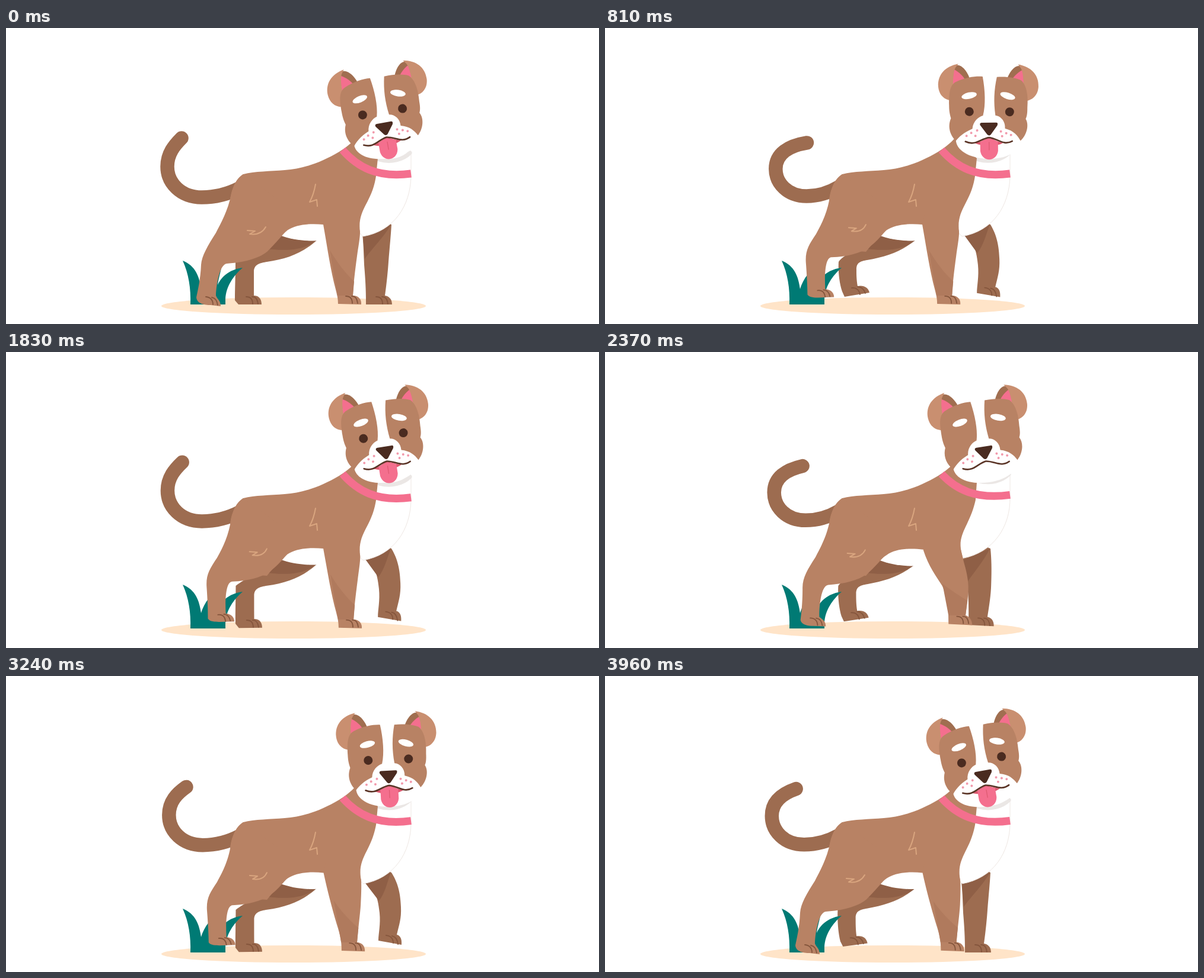
An HTML page for the animation above (3990 ms loop, 1000x500 px).

```html
<!DOCTYPE html>
<html lang="en">
<head>
<meta charset="utf-8">
<title>Walking dog</title>
<style>
  html, body { margin: 0; width: 100%; height: 100%; overflow: hidden; background: #fff; }
  svg { display: block; width: 100%; height: 100%; }
  .coat { fill: #b88264; }
  .dark { fill: #9d6c50; }
  .shade { fill: #8f5f46; }
  .white { fill: #fff; }
  .pink { fill: #f46f8e; }
  .eye { fill: #4a2b20; }
  .line { fill: none; stroke-linecap: round; stroke-linejoin: round; }
  .toes { stroke: #85563d; stroke-width: 1.8; }
  .fur { stroke: #d9a57f; stroke-width: 2; }
</style>
</head>
<body>
<svg viewBox="0 0 1000 500">
  <defs>
    <g id="ear">
      <path fill="#a06e50" d="M588 66C599 55 612 72 616 85L588 100Z"/>
      <path class="pink" d="M589 69C599 74 606 82 609 88C600 90 594 95 587 101Z"/>
      <path fill="#c98f70" d="M597 60C575 64 562 78 563 98C564 112 573 122 588 122C589 103 586 80 592 67Z"/>
    </g>
  </defs>

  <ellipse cx="485" cy="469.5" rx="223" ry="14.5" fill="#ffe4c8"/>
  <path id="tail" class="line" stroke="#9d6c50" stroke-width="23.5"/>
  <path id="farFront" class="dark"/>
  <path id="farFrontShade" class="shade"/>
  <path id="farFrontToes" class="line toes"/>
  <path id="farBack" class="dark"/>
  <path class="shade" d="M462 350L523 359C500 377 470 377 432 372Z"/>
  <path id="farBackToes" class="line toes"/>
  <path fill="#007a74" d="M298 393C320 402 326 420 329 441C334 425 346 405 364 401C362 412 358 425 357 434C364 418 380 407 399 405C384 418 371 436 370 458V467H311C312 440 308 415 298 393Z"/>

  <path id="belly" class="white"/>
  <path id="chest" class="white" stroke="#eee7e3"/>
  <path id="chinShadow" class="line" stroke="#ebe7e5" stroke-width="7"/>
  <path id="torso" class="coat"/>
  <path id="nearBack" class="coat"/>
  <path id="nearBackToes" class="line toes"/>
  <path id="nearFront" class="coat"/>
  <path id="nearFrontShade" fill="#b07a5d"/>
  <path id="nearFrontToes" class="line toes"/>
  <path class="line fur" d="M522 264C520 275 516 287 512 294L524 290L525 301"/>
  <path id="thighFur" class="line fur"/>
  <path id="collar" fill="none" stroke="#f46f8e" stroke-width="13"/>

  <g id="head">
    <path class="white" d="M620 165L592 188C592 205 612 220 648 221C684 221 700 206 702 190L680 150L662 83H638Z"/>
    <use href="#ear"/>
    <use href="#ear" transform="matrix(-1 0 0 1 1295 2)"/>
    <path class="coat" d="M581 130C581 110 582 95 594 90C610 83 626 81 638 82C642 105 643 130 638 148C630 150 621 158 620 170C605 176 597 184 592 190C584 183 577 168 584 152C582 145 581 140 581 130Z"/>
    <path class="coat" d="M662 83C680 82 695 85 703 89C712 97 715 115 713 135C713 145 712 150 710 154C716 164 712 181 701 191C696 182 690 174 675 170C676 158 668 149 659 148C656 125 657 105 662 83Z"/>
    <ellipse class="white" cx="615" cy="114" rx="13" ry="5.5" transform="rotate(-12 615 114)"/>
    <ellipse class="white" cx="680" cy="115" rx="13" ry="5.5" transform="rotate(18 680 115)"/>
    <ellipse id="eyeLeft" class="eye" cx="615" cy="141" rx="7.5"/>
    <ellipse id="eyeRight" class="eye" cx="683" cy="142" rx="7.5"/>
    <path class="eye" d="M633 164Q632 160 636 160H660Q664 160 662 165L651 180Q648 183 645 180Z"/>
    <g id="freckles" fill="#f29aac"></g>
    <g id="tongue">
      <path fill="#dc5a70" d="M623 194C635 193 640 187 648 186C656 187 662 193 672 194C660 201 640 201 623 194Z"/>
      <path class="pink" d="M633 192V208C636 227 660 227 663 208V192C655 189 650 187 648 187S640 189 633 192Z"/>
      <path class="line" stroke="#dc5a70" stroke-width="1.2" d="M648 193V206"/>
    </g>
    <path class="line" stroke="#5a3426" stroke-width="2.6" d="M608 191.5C625 199.5 633 187 648 185C663 187 672 199.5 687 191.5"/>
  </g>
</svg>
<script>
const LOOP = 3990, STEP = 30;
const $ = id => document.getElementById(id);

// Two poses per shape; both have the same path commands.
const poses = {
  tail: ["M395 270C370 283 345 286 330 286C295 286 272 262 272 234C272 212 284 198 296 186",
         "M395 268C375 280 355 284 340 284C308 284 288 262 288 238C288 212 310 199 341 194"],
  farFront: ["M600 340C603 360 603 380 604 400C606 425 607 440 607 467L651 467C651 457 645 453 639 452C642 430 644 410 645 395C647 370 649 350 650 332L620 320Z",
             "M600 340C620 355 627 370 630 400C632 420 628 435 628 447L667 454C668 443 664 438 659 437C663 420 667 410 666 390C665 360 658 345 650 332L620 320Z"],
  farFrontShade: ["M602 352L605 390C615 375 640 350 649 332Z", "M606 350L629 380C640 365 642 350 649 332Z"],
  farFrontToes: ["M624 454C632 454 635 459 635 466M634 454C641 454 643 459 644 466",
                 "M641 438C649 439 653 444 653 451M651 439C658 440 660 446 661 453"],
  farBack: ["M455 350C430 370 400 385 387 395C387 420 386 440 386 460L392 467L431 467C431 456 425 452 418 452C418 440 418 425 418 412C418 398 430 397 440 395C475 390 500 380 525 358Z",
            "M455 350C430 370 400 385 394 395C393 410 395 430 400 445L404 454L446 447C444 438 436 434 426 436C424 425 424 415 424 408C424 395 432 394 442 392C475 386 500 378 523 358Z"],
  farBackToes: ["M405 454C413 454 416 459 416 466M415 454C422 454 424 459 425 466",
                "M416 439C424 438 429 443 430 450M426 437C433 437 437 442 439 448"],
  nearBack: ["M400 247C388 255 384 265 380 280C374 310 362 330 354 346C340 368 330 385 329 400C328 425 323 445 321 455C322 466 335 468 345 468L362 470C362 460 356 458 354 452C354 440 359 400 372 398C400 396 425 390 440 378C455 364 465 350 474 342L474 300Z",
             "M400 247C388 255 384 265 380 280C376 310 366 330 356 348C344 366 338 375 339 395C341 420 342 440 342 450C345 455 355 455 360 455L387 454C387 446 380 441 372 441C371 425 370 388 382 387C410 386 430 380 444 371C455 364 465 352 474 342L474 300Z"],
  nearBackToes: ["M337 454C345 455 349 460 349 467M347 455C353 456 356 461 357 468",
                 "M359 443C367 442 371 447 372 454M369 442C375 442 379 447 380 453"],
  thighFur: ["M407 342L420 343L411 348C425 350 433 345 438 336", "M411 337L424 338L416 343C429 345 436 341 440 332"],
  nearFront: ["M535 332C541 365 545 395 553 430C558 450 560 455 560 466L599 467C600 458 594 452 585 452C586 430 590 400 592 385C594 370 597 355 597 345L590 310L540 310Z",
              "M537 335C546 362 560 378 570 392C580 412 581 430 581 459L621 461C621 452 616 446 610 444C613 425 616 405 614 390C612 370 606 358 604 348L595 310L540 310Z"],
  nearFrontShade: ["M546 375C558 396 573 415 587 428L585 452L559 452Z", "M571 393C584 402 600 412 613 419L610 444L581 444Z"],
  nearFrontToes: ["M573 453C581 453 584 458 584 465M583 453C590 453 592 458 593 465",
                  "M595 446C603 446 606 451 606 458M605 446C612 446 614 451 615 458"],
  belly: ["M462 350C480 332 520 328 540 332L548 357C515 362 485 359 462 350Z",
          "M463 352C482 334 520 331 540 335L555 360C515 364 485 361 463 352Z"],
  chest: ["M622 222L683 208L683 250C682 300 655 343 602 352L590 340Z",
          "M622 222L683 208L683 245C684 295 655 338 604 348L592 338Z"],
  chinShadow: ["M629 222C650 228 670 222 681 211", "M629 217C650 223 670 217 681 206"],
  torso: ["M562 209C530 228 500 238 470 240C445 242 420 242 400 247C385 258 380 275 378 290L400 375L440 378C450 366 462 350 474 342C490 331 515 330 535 332L597 345C592 305 617 297 624 250L627 220L590 186C583 194 572 203 562 209Z",
          "M562 209C530 228 500 238 470 240C445 242 420 242 400 247C385 258 380 275 378 290L400 375L440 378C450 366 462 351 475 343C491 332 515 331 537 334L604 348C590 308 614 298 625 250L627 220L590 186C583 194 572 203 562 209Z"],
  collar: ["M567.5 206C592 234 625 254 683 246", "M567.5 206C592 232 625 249 683 241"]
};

const drivers = {
  tail: ["tail"],
  farBackStep: ["farBack", "farBackToes"],
  farFrontStep: ["farFront", "farFrontShade", "farFrontToes"],
  nearBackStep: ["nearBack", "nearBackToes", "thighFur"],
  nearFrontStep: ["nearFront", "nearFrontShade", "nearFrontToes", "belly", "chest", "chinShadow", "torso", "collar"]
};

$("freckles").innerHTML = [[618,177],[628,173],[610,182],[625,182],[668,175],[677,178],[685,181],[670,183]]
  .map(([x, y]) => `<circle cx="${x}" cy="${y}" r="2"/>`).join("");

const swing = (t, period) => (1 - Math.cos(2 * Math.PI * t / period)) / 2;
const smooth = x => x * x * (3 - 2 * x);

function mix([from, to], k) {
  const ends = to.match(/[\d.]+/g);
  let i = 0;
  return from.replace(/[\d.]+/g, n => (+n + (ends[i++] - n) * k).toFixed(2));
}

// Eased interpolation through [time, value] keys
function track(keys, t) {
  const next = keys.findIndex(key => key[0] > t);
  if (next < 0) return keys.at(-1)[1];
  const [t0, a] = keys[next - 1], [t1, b] = keys[next];
  return a + (b - a) * swing(t - t0, 2 * (t1 - t0));
}

const headTurn = [[0, -10], [550, 4], [1200, -9], [2370, -9], [2920, 4], [3560, -10]];
const awake = [[0, 1], [1110, 1], [1230, 0], [1530, 0], [1650, 1], [2070, 1], [2190, 0], [2460, 0], [2580, 1]];

function draw(t) {
  const amount = {
    tail: swing(t, 1740),
    farBackStep: swing(t, 1690),
    farFrontStep: smooth(swing(t, 1320)),
    nearBackStep: smooth(swing(t, 1340)),
    nearFrontStep: t < 775 ? 0 : swing(t - 775, 1132)
  };
  for (const name in drivers)
    for (const id of drivers[name]) $(id).setAttribute("d", mix(poses[id], amount[name]));

  $("head").setAttribute("transform", `rotate(${track(headTurn, t)} 642 221.5)`);
  const open = track(awake, t);
  for (const id of ["eyeLeft", "eyeRight"]) $(id).setAttribute("ry", 7.5 * open);
  $("tongue").setAttribute("transform", `translate(648 187) scale(${open}) translate(-648 -187)`);
}

function frame() {
  draw(Math.floor(performance.now() % LOOP / STEP) * STEP);
  requestAnimationFrame(frame);
}
frame();
</script>
</body>
</html>
```
